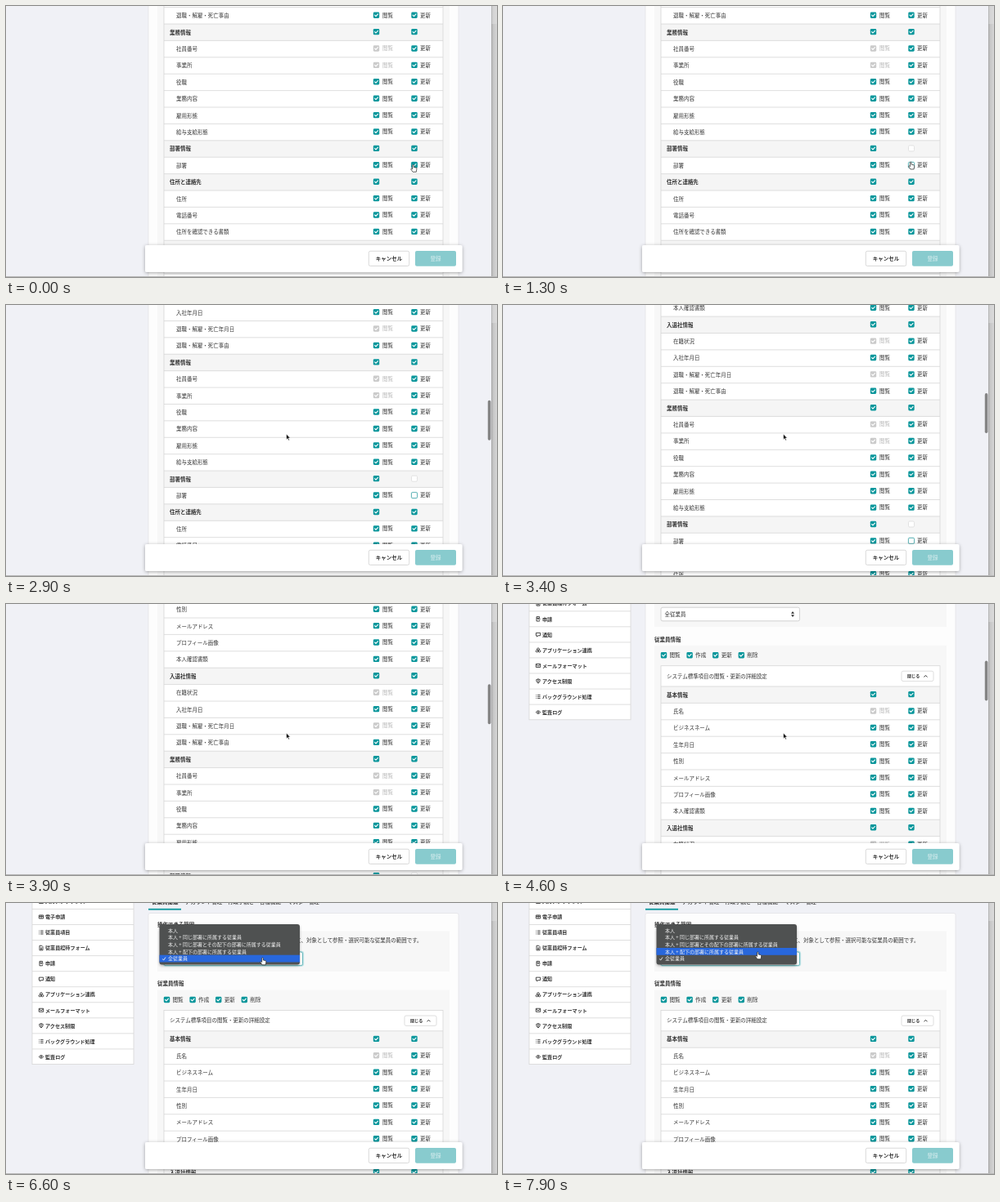
An HTML page that plays this animation: 600x332 px, repeating every 8000 ms.

```html
<!DOCTYPE html>
<html lang="ja">
<head>
<meta charset="utf-8">
<style>
html, body { margin: 0; width: 100%; height: 100%; overflow: hidden; background: #f0f1f6; }
svg { display: block; font-family: "Noto Sans CJK JP", "Noto Sans CJK", sans-serif; }
text { white-space: pre; }
</style>
</head>
<body>
<svg id="stage" width="600" height="332" viewBox="0 0 600 332"></svg>
<script>
const TEAL = '#0a979c', LINE = '#d6d6d6', INK = '#333';
const PITCH = 20.4, ROW0 = 167;

// Drawing helpers; y of a text is its vertical middle
const rect = (x, y, w, h, fill, more = '') =>
  `<rect x="${x}" y="${y}" width="${w}" height="${h}" fill="${fill}" ${more}/>`;
const text = (s, x, y, { size = 6.48, fill = INK, weight = 500, anchor = 'start' } = {}) =>
  `<text x="${x}" y="${y + size * 0.37}" font-size="${size}" fill="${fill}" font-weight="${weight}" text-anchor="${anchor}">${s}</text>`;
const path = (d, more) => `<path d="${d}" fill="none" ${more}/>`;
const hline = (x1, x2, y) => path(`M${x1} ${y}H${x2}`, `stroke="${LINE}" stroke-width=".8"`);
const group = (id, body, more = '') => `<g id="${id}" ${more}>${body}</g>`;
const tick = (x, y) =>
  path(`M${x - 1.9} ${y}l1.4 1.4l2.5-2.7`, 'stroke="#fff" stroke-width="1.1" stroke-linecap="round" stroke-linejoin="round"');
const check = (x, y, fill = TEAL) => rect(x - 3.7, y - 3.7, 7.4, 7.4, fill, 'rx="1.4"') + tick(x, y);
const outline = (x, y, color) => rect(x - 3.5, y - 3.5, 7, 7, '#fff', `rx="1.4" stroke="${color}" stroke-width=".8"`);

const sections = [
  '基本情報', '氏名*,ビジネスネーム,生年月日,性別,メールアドレス,プロフィール画像,本人確認書類',
  '入退社情報', '在籍状況*,入社年月日,退職・解雇・死亡年月日*,退職・解雇・死亡事由',
  '業務情報', '社員番号*,事業所*,役職,業務内容,雇用形態,給与支給形態',
  '部署情報', '部署',
  '住所と連絡先', '住所,電話番号,住所を確認できる書類',
  '家族情報', '続柄,扶養状況'
];

function table() {
  let out = rect(193, 131.5, 341, 640, '#fff'), n = 0;
  out += text('システム標準項目の閲覧・更新の詳細設定', 200, 144);
  out += rect(487, 138, 39, 12.4, '#fff', `rx="2" stroke="${LINE}" stroke-width=".8"`);
  out += text('閉じる', 494, 144.2, { size: 5.1, weight: 700 });
  out += path('M514.5 145.3l2-2l2 2', `stroke="${INK}" stroke-width="1"`);
  sections.forEach((part, i) => part.split(',').forEach(item => {
    const y = ROW0 + PITCH * n++, head = i % 2 === 0, locked = item.endsWith('*');
    const name = item.replace('*', ''), cy = y - 0.6;
    if (head) out += rect(193, y - 10.2, 341, PITCH, '#f5f5f5');
    out += hline(193, 534, y - 10.2);
    out += text(name, head ? 200 : 208, y, { weight: head ? 600 : 500 });
    out += check(452.5, cy, locked ? '#cbcbcb' : TEAL);
    if (name === '部署情報') out += outline(499, cy, '#dcdcdc') + group('headMark', check(499, cy));
    else if (name === '部署') {
      out += rect(494.6, cy - 4.4, 8.8, 8.8, '#cfeaeb', 'rx="2"') + outline(499, cy, '#4aa9ad');
      out += group('rowMark', check(499, cy));
    } else out += check(499, cy);
    if (!head) out += text('閲覧', 460, cy, { fill: locked ? '#b8b8b8' : INK }) + text('更新', 506, cy);
  }));
  return out + rect(193, 131.5, 341, 640, 'none', `stroke="${LINE}" stroke-width=".8"`);
}

// Side menu icons, drawn around 0,0
const icons = {
  people: 'M-2.5 2.5V-1L0-2.5L2.5-1V2.5zM-1 2.5V0H1V2.5',
  globe: 'M-2.6-2H2.6V2H-2.6zM-2.6-.5H2.6M0-2V2',
  list: 'M-2.6-2H-1.8M-.8-2H2.6M-2.6 0H-1.8M-.8 0H2.6M-2.6 2H-1.8M-.8 2H2.6',
  file: 'M-2-2.8H.8L2-1.5V2.8H-2zM-1 0H1M-1 1.4H1',
  sign: 'M1.5-1.2V-2.7H-2V2.7H1.5V1.5M-.8 0H2.6M-2-.9H1.5',
  chat: 'M-2.6-2H2.6V1.4H0L-1.6 2.7V1.4H-2.6z',
  cubes: 'M0-2.6L1.3-1.8V-.4L0 .2L-1.3-.4V-1.8zM-1.5 .1L-.1 .8V2L-1.5 2.6L-2.8 2V.8zM1.5 .1L2.8 .8V2L1.5 2.6L.1 2V.8z',
  mail: 'M-2.7-2H2.7V2H-2.7zM-2.7-1.3L0 .6L2.7-1.3',
  shield: 'M0-2.7L2.3-1.8Q2.3 1.6 0 2.7Q-2.3 1.6-2.3-1.8zM0-2.4V2.3',
  eye: 'M-2.8 0Q0-3.6 2.8 0Q0 3.6-2.8 0zM-.8 0A.8 .8 0 1 0 .8 0A.8 .8 0 1 0-.8 0'
};
const menu = [
  ['入力メンテナンス', 'people'], ['電子申請', 'globe'], ['従業員項目', 'list'], ['従業員招待フォーム', 'file'],
  ['申請', 'sign'], ['通知', 'chat'], ['アプリケーション連携', 'cubes'], ['メールフォーマット', 'mail'],
  ['アクセス制限', 'shield'], ['バックグラウンド処理', 'list'], ['監査ログ', 'eye']
];

function sidebar() {
  let out = rect(32, -30, 124, 227.6, '#fff', `stroke="${LINE}" stroke-width=".8"`);
  menu.forEach(([name, icon], i) => {
    const y = -2.1 + 19.05 * i;
    out += hline(32, 156, y - 9.5) + text(name, 48, y, { size: 6.1, weight: 600 });
    out += path(icons[icon], `transform="translate(43 ${y})" stroke="${INK}" stroke-width=".9"`);
  });
  return out;
}

function panel() {
  const tabs = [['従業員関連', 178], ['アカウント管理', 219], ['行政手続き', 271], ['各種機能', 310], ['マスター管理', 344]];
  const bold = { weight: 700 };
  let out = tabs.map(([s, x]) => text(s, x, -1, { weight: 600, fill: x < 180 ? INK : '#555' })).join('');
  out += rect(174, 6.8, 40, 1.8, TEAL);
  out += rect(174, 12.5, 379, 900, '#fdfdfd', 'rx="2" stroke="#e4e4e8" stroke-width=".8"');
  out += text('操作できる範囲', 185, 27, bold) + rect(185, 34.5, 357, 49.5, '#f7f7f7');
  out += text('従業員情報の操作や行政手続きの依頼などを実施する際に、対象として参照・選択可能な従業員の範囲です。', 192.5, 46);
  out += group('ring', rect(191.8, 58.8, 172.4, 19, '#c5e6e8', 'rx="3"'));
  out += rect(193, 60, 169.5, 16.6, '#fff', 'id="select" rx="2" stroke="#c8c8c8" stroke-width=".8"');
  out += text('全従業員', 197.5, 68.2);
  out += `<path d="M352 67.5l2-2.8l2 2.8zM352 69l2 2.8l2-2.8z" fill="${INK}"/>`;
  out += text('従業員情報', 185, 99, bold) + rect(185, 106.5, 357, 700, '#f7f7f7');
  ['閲覧', '作成', '更新', '削除'].forEach((s, i) => {
    out += check(196.5 + 31.6 * i, 118.5) + text(s, 203.5 + 31.6 * i, 118.7, { size: 6.6 });
  });
  return out + table();
}

function dropdown() {
  const options = ['本人', '本人 + 同じ部署に所属する従業員', '本人 + 同じ部署とその配下の部署に所属する従業員',
    '本人 + 配下の部署に所属する従業員', '全従業員'];
  let out = rect(187.5, 26, 171.5, 49.5, '#505151', 'rx="3" filter="url(#soft)"');
  out += rect(187.5, 0, 171.5, 8.8, '#2867dc', 'id="hilite"');
  options.forEach((s, i) => out += text(s, 198, 33.3 + 8.72 * i, { size: 6, fill: '#f2f2f2' }));
  return out + path('M191.3 68.4l1.3 1.7l2.4-3.6', 'stroke="#f2f2f2" stroke-width=".9"');
}

const footer =
  rect(170, 293, 387.5, 33, '#fff', 'rx="2" filter="url(#lift)"') +
  rect(443.3, 300.3, 49.4, 18.2, '#fff', 'rx="2" stroke="#d0d0d0" stroke-width=".8"') +
  text('キャンセル', 468, 309.4, { weight: 700, anchor: 'middle' }) +
  rect(500, 300, 50, 18.8, '#88cbce', 'rx="2"') +
  text('登録', 525, 309.4, { weight: 700, anchor: 'middle', fill: '#c3e4e6' });

const ARROW = 'M0 0V6.9L1.6 5.5L2.7 8L3.9 7.5L2.8 5.1H4.9z';
const HAND = 'M-.8 .4Q0-.5 .8 .4V3L3.6 3.6Q4.6 3.9 4.4 5L3.8 8.8H-.4L-2.7 5.6Q-2.8 4.4-1.6 4.8L-.8 5.4z';

document.getElementById('stage').innerHTML = `
  <defs>
    <filter id="lift" x="-10%" y="-40%" width="120%" height="180%"><feDropShadow dx="0" dy="1" stdDeviation="2.2" flood-opacity=".35"/></filter>
    <filter id="soft" x="-10%" y="-30%" width="120%" height="170%"><feDropShadow dx="0" dy="1.5" stdDeviation="1.8" flood-opacity=".3"/></filter>
    <linearGradient id="edge"><stop stop-color="#a9a9a9"/><stop offset=".35" stop-color="#c6c6c6"/><stop offset="1" stop-color="#d6d6d6"/></linearGradient>
  </defs>` +
  rect(0, 0, 600, 332, '#f0f1f6') +
  group('page', sidebar() + panel()) + footer +
  rect(588.8, 0, 3.6, 49, '#858585', 'id="thumb" rx="1.8"') +
  rect(593, 0, 7, 332, 'url(#edge)') + rect(593.6, 0, 6.4, 22, '#e2e2e2', 'opacity=".5"') +
  rect(0, 331, 600, 1, '#b9b9b9') +
  group('popup', dropdown()) +
  group('cursor',
    `<path id="arrow" d="${ARROW}" fill="#111" stroke="#fff" stroke-width=".6"/>` +
    `<path id="hand" d="${HAND}" fill="#fff" stroke="#222" stroke-width=".7"/>`);

const el = id => document.getElementById(id);
const clamp = v => Math.min(1, Math.max(0, v));
const ramp = (t, a, b) => clamp((t - a) / (b - a));
const show = (id, v) => el(id).setAttribute('opacity', +v);

// Time, scroll offset, speed per ms
const scrollKeys = [[2310, 400, 0], [3400, 306, -.1], [3900, 242, -.2], [4600, 56, -.2], [5350, 0, 0]];
function scrollAt(t) {
  if (t <= scrollKeys[0][0]) return 400;
  const i = scrollKeys.findIndex(k => k[0] > t);
  if (i < 0) return 0;
  const [t0, a, va] = scrollKeys[i - 1], [t1, b, vb] = scrollKeys[i];
  const d = t1 - t0, u = (t - t0) / d, w = u * u * (3 - 2 * u);
  return a + (b - a) * w + d * u * (1 - u) * (va * (1 - u) - vb * u);
}

// Time, x, y of the pointer tip
const moves = [[0, 497.5, 194.5], [750, 497.5, 194.5], [1150, 502, 198], [1600, 488, 172], [2200, 342.5, 158],
  [5600, 342.5, 158], [6300, 314, 67], [6900, 313, 67], [7400, 311.3, 60], [8000, 311.3, 60]];
function pointerAt(t) {
  const i = moves.findIndex(k => k[0] > t);
  const [t0, x0, y0] = moves[i - 1], [t1, x1, y1] = moves[i];
  const u = (t - t0) / (t1 - t0), w = u * u * (3 - 2 * u);
  return [x0 + (x1 - x0) * w, y0 + (y1 - y0) * w];
}

function draw(t) {
  const s = scrollAt(t), [x, y] = pointerAt(t), open = t >= 6500;
  const onHand = t < 1400 || t > 6150;
  el('page').setAttribute('transform', `translate(0 ${-s})`);
  el('thumb').setAttribute('y', 61 + 0.154 * s);
  show('thumb', ramp(t, 2410, 2500) * (1 - ramp(t, 5750, 6000)));
  show('rowMark', 1 - ramp(t, 50, 190));
  show('headMark', 1 - ramp(t, 50, 190));
  show('popup', open);
  show('ring', open);
  el('select').setAttribute('stroke', open ? '#4aa9ad' : '#c8c8c8');
  el('hilite').setAttribute('y', y < 64 ? 55 : 63.7);
  el('cursor').setAttribute('transform', `translate(${x} ${y})`);
  show('hand', onHand);
  show('arrow', !onHand);
}

const start = performance.now();
function loop() {
  draw((performance.now() - start) % 8000);
  requestAnimationFrame(loop);
}
loop();
</script>
</body>
</html>
```
